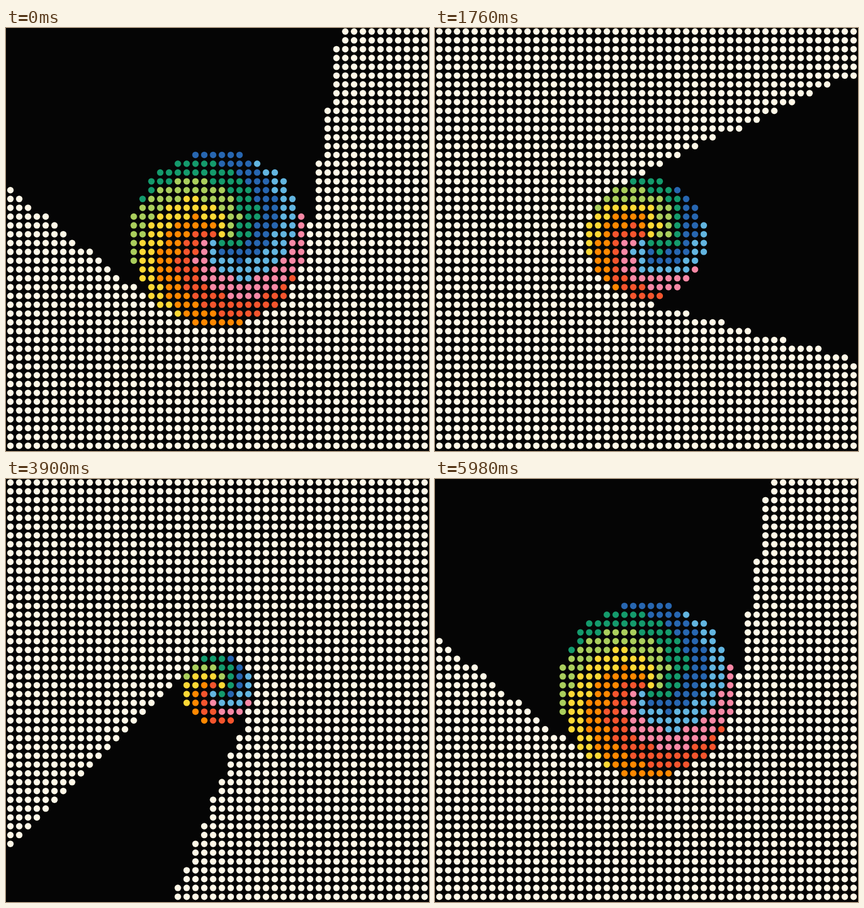
An HTML page with a canvas for the animation above (6 s loop, 748 px wide and 748 px high).

```html
<!DOCTYPE html>
<html lang="en">
<head>
<meta charset="utf-8">
<title>Dot shadow</title>
<style>
  html, body { margin: 0; width: 100%; height: 100%; overflow: hidden; background: #050505; }
  canvas { display: block; width: 748px; height: 748px; }
</style>
</head>
<body>
<canvas id="stage" width="748" height="748"></canvas>
<script>
const ctx = document.getElementById('stage').getContext('2d');
const SIZE = 748, COUNT = 48, CELL = SIZE / COUNT;
const DOT = 5.75, SHIFT_Y = -1.55;
const LOOP = 6000, STEP = 20, STEPS = LOOP / STEP;
const ORBIT = 20; // distance of the light from the centre, in cells
const START = 68.4 * Math.PI / 180;
const LIT = '#fff8e7', DARK = '#050505';
const WHEEL = ['#2766b0', '#62b5e0', '#f788a5', '#f4552d', '#ff8800', '#fdd835', '#aace5c', '#149a6c'];

// True when the disc blocks the straight line from the light to the dot.
function inShadow(x, y, lx, ly, radius) {
  const dot = lx * x + ly * y;
  if (dot >= x * x + y * y || dot >= ORBIT * ORBIT) return false;
  return Math.abs(lx * y - ly * x) < radius * Math.hypot(lx - x, ly - y);
}

// Colour of a dot on the disc: a half-turn spiral, spinning three times as fast as the light.
function spiral(x, y, dist, radius, turn) {
  const index = (Math.atan2(y, x) + 3 * turn) * 4 / Math.PI + 4 * dist / radius + 2;
  return WHEEL[((Math.floor(index) % 8) + 8) % 8];
}

function draw(time) {
  const tick = Math.floor((time % LOOP) / STEP);
  // The first pose repeats the last one.
  const turn = START + 2 * Math.PI * (tick ? tick + 1 : 0) / STEPS;
  const radius = 7.5 + 3.75 * Math.sin(2 * turn);
  const lx = ORBIT * Math.cos(turn), ly = ORBIT * Math.sin(turn);

  ctx.fillStyle = DARK;
  ctx.fillRect(0, 0, SIZE, SIZE);
  for (let row = 0; row < COUNT; row++) {
    for (let col = 0; col < COUNT; col++) {
      const x = col + 0.5 - COUNT / 2, y = row + 0.5 - COUNT / 2;
      const dist = Math.hypot(x, y);
      if (dist < radius) ctx.fillStyle = spiral(x, y, dist, radius, turn);
      else if (inShadow(x, y, lx, ly, radius)) continue;
      else ctx.fillStyle = LIT;
      ctx.beginPath();
      ctx.arc((col + 0.5) * CELL, (row + 0.5) * CELL + SHIFT_Y, DOT, 0, 2 * Math.PI);
      ctx.fill();
    }
  }
}

function loop() {
  draw(performance.now());
  requestAnimationFrame(loop);
}
loop();
</script>
</body>
</html>
```
